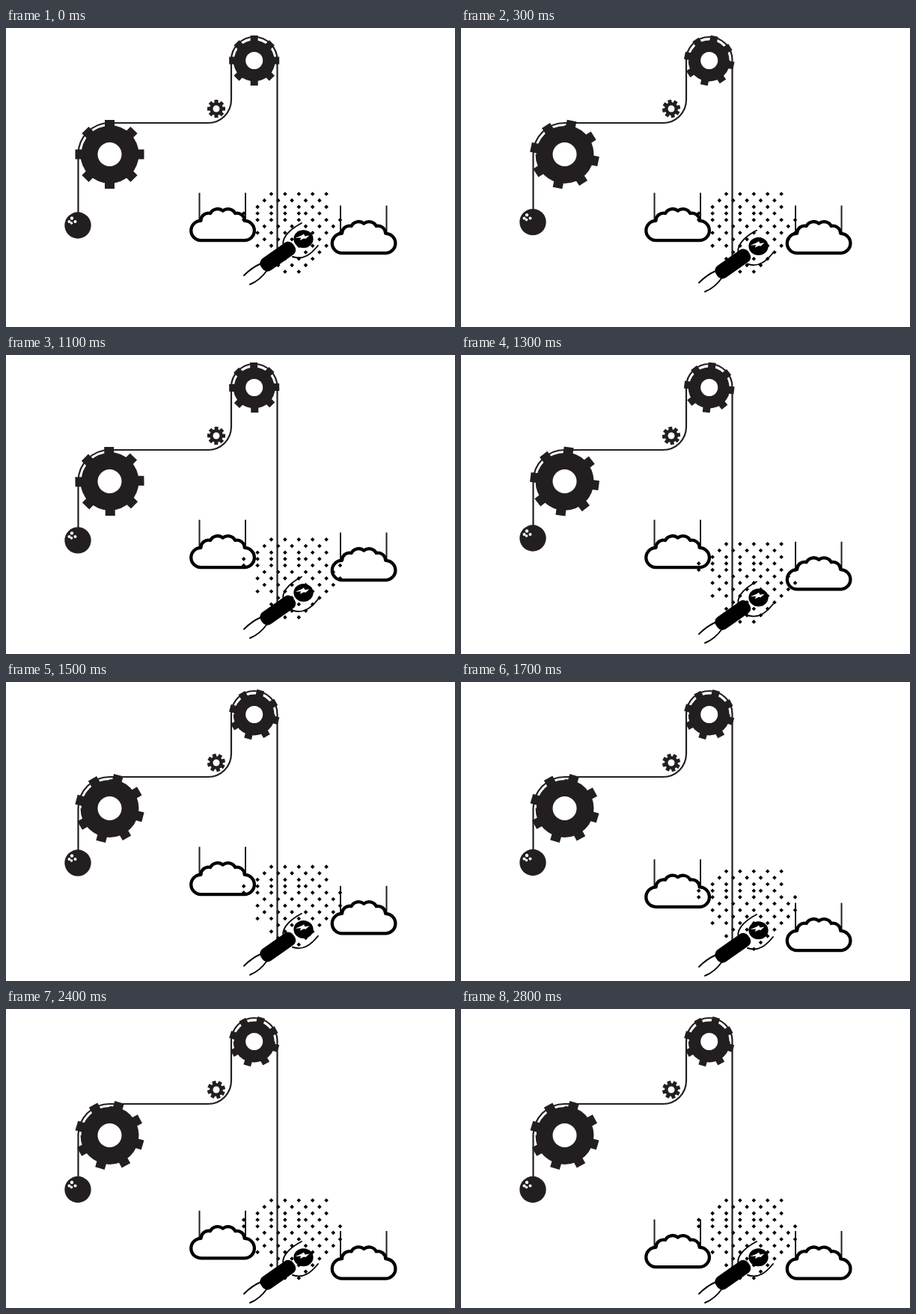
An HTML page for the animation above (4700 ms loop, 600 by 400 pixels).

```html
<!DOCTYPE html>
<html lang="en">
<head>
<meta charset="utf-8">
<title>Pulley</title>
<style>
  html, body { margin: 0; width: 100%; height: 100%; overflow: hidden; background: #fff; }
  svg { display: block; width: 100vw; height: 100vh; }
  .rope { fill: none; stroke: #231f20; stroke-width: 2.2; }
  .gap { fill: none; stroke: #fff; stroke-width: 2.2; }
  .ink { fill: #231f20; }
  .limb { fill: none; stroke: #000; stroke-width: 1.9; stroke-linecap: round; }
  .puff { fill: none; stroke: #000; stroke-width: 4.3; stroke-linejoin: round; }
  .white { fill: #fff; }
</style>
</head>
<body>
<svg viewBox="0 0 600 400">
  <defs>
    <g id="cloud">
      <path class="rope" style="stroke-width:2" d="M258.5 220.5V258M320 220.5V258"/>
      <path class="puff" d="M260.5 284.200A13.200 13.200 0 0 1 260.500 257.800A10 10 0 0 1 273 248A11 11 0 0 1 289.700 244.500A11 11 0 0 1 306.300 248A10 10 0 0 1 318.700 257.800A13.200 13.200 0 0 1 318.700 284.200Z"/>
    </g>
  </defs>

  <g id="left"><use href="#cloud"/></g>
  <g id="right"><use href="#cloud" x="188.5" y="17"/></g>
  <path id="dots"/>

  <g id="gears"></g>
  <path class="rope" d="M96.5 169A42 42 0 0 1 138.500 127H270A31 31 0 0 0 301 96V43A30.750 31 0 0 1 362.500 43"/>
  <path class="rope" id="ballRope"/>
  <path class="rope" id="manRope"/>

  <g id="ball">
    <circle class="ink" cx="96" cy="264" r="17.7"/>
    <g class="white">
      <circle cx="88" cy="254.500" r="2.2"/>
      <circle cx="84.500" cy="259" r="2"/>
      <circle cx="92.500" cy="259" r="2"/>
      <circle cx="87.500" cy="261" r="1.800"/>
    </g>
  </g>

  <g id="man">
    <path class="limb" d="M372 294C366 284 376 271 395 261M383 306C398 311 408 302 417 291M341 315Q329 320 318 331M349 324Q339 338 326 343"/>
    <rect x="337" y="296" width="52.500" height="19.600" rx="8" transform="rotate(-35 363.2 305.8)"/>
    <ellipse cx="397.500" cy="282.200" rx="13.100" ry="12"/>
    <path class="white" d="M386.500 281L395 277.500L398 275.500L399.500 278.500L405.500 277.500L400.500 282L398 281.500L393 284L394 280.500Z"/>
  </g>
</svg>
<script>
const $ = id => document.getElementById(id);
const LOOP = 4700, STEP = 100, FALL = 50;

const gears = [
  { x: 138.5, y: 169, r: 39, tip: 46, tooth: 13, hole: 16, arc: [180, 270], dir: 1 },
  { x: 331.7, y: 43.5, r: 28, tip: 33.5, tooth: 10, hole: 11.5, arc: [180, 360], dir: 1 },
  { x: 281, y: 108, r: 8.8, tip: 12, tooth: 5, hole: 4.5, dir: -1 }
];

function point(r, deg) {
  const a = deg * Math.PI / 180;
  return `${r * Math.cos(a)} ${r * Math.sin(a)}`;
}

function gearMarkup(g) {
  const gap = g.arc ? `<path class="gap" d="M${point(g.r, g.arc[0])}A${g.r} ${g.r} 0 0 1 ${point(g.r, g.arc[1])}"/>` : '';
  let teeth = '';
  for (let i = 0; i < 8; i++) {
    teeth += `<rect x="${-g.tooth / 2}" y="${-g.tip}" width="${g.tooth}" height="${g.tip - g.r + 4}" transform="rotate(${i * 45})"/>`;
  }
  return `<g class="ink" transform="translate(${g.x} ${g.y})"><circle r="${g.r}"/>${gap}` +
    `<g class="teeth">${teeth}</g><circle class="white" r="${g.hole}"/></g>`;
}

// Staggered halftone; the left part of one row lines up with its neighbours.
function dotPath() {
  const from = [0, -1, -2, -4, -4, -1, -2, -1, -2, 1, 0, 1, 2];
  const to = [8, 7, 8, 7, 10, 9, 10, 9, 8, 7, 6, 5, 4];
  let d = '';
  from.forEach((first, row) => {
    for (let i = first; i <= to[row]; i++) {
      const odd = row === 3 && i <= 4 ? 0 : row % 2;
      if (Math.abs(i % 2) !== odd) continue;
      d += `M${354.5 + 9.2 * i} ${222 + 8.67 * row - 2.8}l2.8 2.8l-2.8 2.8l-2.8 -2.8z`;
    }
  });
  return d;
}

$('gears').innerHTML = gears.map(gearMarkup).join('');
$('dots').setAttribute('d', dotPath());
const teeth = document.querySelectorAll('.teeth');

// Drop to 1, rebound, settle at 1.
function drop(u) {
  const rebound = 0.26;
  if (u <= 0) return 0;
  if (u < 520) return u / 520;
  if (u < 780) return 1 - rebound * Math.sin((u - 520) / 260 * Math.PI / 2);
  const rest = Math.max(0, 1 - (u - 780) / 460);
  return 1 - rebound * rest * rest;
}

const shift = (id, y) => $(id).setAttribute('transform', `translate(0 ${y})`);

function draw(t) {
  const y = Math.min(FALL, t * 0.0325);
  const lift = y * 0.45;
  shift('man', y);
  shift('ball', -lift);
  $('manRope').setAttribute('d', `M362.5 43V${300 + y}`);
  $('ballRope').setAttribute('d', `M96.5 169V${250 - lift}`);
  teeth.forEach((el, i) => el.setAttribute('transform', `rotate(${y * 1.23 * gears[i].dir})`));
  shift('dots', 34 * drop(t - 720));
  shift('right', 59.5 * drop(t - 1193));
  shift('left', 61 * drop(t - 1558));
}

function tick() {
  const t = performance.now() % LOOP;
  draw(Math.min(2800, Math.floor(t / STEP) * STEP));
  requestAnimationFrame(tick);
}
tick();
</script>
</body>
</html>
```
